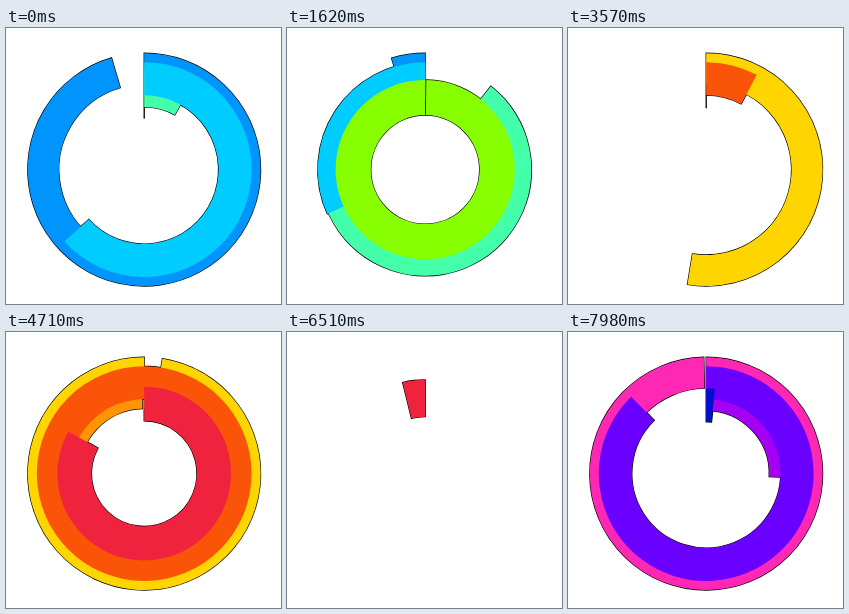
Recreate the animation shown at these times as an HTML page. Size 275 by 276 pixels, loop 8 s.

```html
<!DOCTYPE html>
<html lang="en">
<head>
<meta charset="utf-8">
<title>Ring loader</title>
<style>
  html, body { margin: 0; width: 100%; height: 100%; overflow: hidden; background: #fff; }
  svg { display: block; width: 100%; height: 100%; }
</style>
</head>
<body>
<svg viewBox="0 0 275 276">
  <path id="outline" fill="none" stroke="#000" stroke-width="1.3"/>
  <g id="fills"></g>
</svg>
<script>
const LOOP = 8000, STEP = 30, CX = 138.2, CY = 141.6;

// Each set of four rings starts at its own time.
const sets = [
  { at: -977, colors: ['#0094ff', '#00ccff', '#44ffaa', '#88ff00'] },
  { at: 2929, colors: ['#ffd500', '#fa5408', '#ff9505', '#f0233f'] },
  { at: 6838, colors: ['#ff28b4', '#6a00ff', '#a400f4', '#0010d0'] }
];

// head and tail: [delay, duration]; grow: [outer, inner] widening over life
const rings = [
  { outer: 116.4, inner: 85.4, grow: [0, 0], head: [0, 1260], tail: [1526, 1385] },
  { outer: 107.4, inner: 74.4, grow: [0, 0], head: [318, 1200], tail: [1825, 1354] },
  { outer: 99, inner: 62, grow: [10.5, 9], head: [625, 1290], tail: [2225, 1247] },
  { outer: 84.8, inner: 51.6, grow: [9, 5.3], head: [934, 1300], tail: [2550, 1310] }
];
const stacking = [0, 2, 1, 3];

const outline = document.getElementById('outline');
const group = document.getElementById('fills');
const fills = stacking.map(() =>
  group.appendChild(document.createElementNS('http://www.w3.org/2000/svg', 'path')));

const clamp = x => Math.min(1, Math.max(0, x));
const ease = x => x < 0.5 ? 4 * x ** 3 : 1 - 4 * (1 - x) ** 3;
const sweep = (time, [delay, duration]) => 360 * ease(clamp((time - delay) / duration));

function point(r, deg) {
  const a = deg * Math.PI / 180;
  return (CX + r * Math.sin(a)).toFixed(3) + ' ' + (CY - r * Math.cos(a)).toFixed(3);
}

function sector(outer, inner, from, to) {
  const mid = (from + to) / 2;
  const arc = (r, dir, deg) => `A${r} ${r} 0 0 ${dir} ${point(r, deg)}`;
  return `M${point(outer, from)}` + arc(outer, 1, mid) + arc(outer, 1, to) +
    `L${point(inner, to)}` + arc(inner, 0, mid) + arc(inner, 0, from) + 'Z';
}

function ringPath(ring, time) {
  const end = sweep(time, ring.head);
  let start = sweep(time, ring.tail);
  if (end <= 0 || start >= 360) return '';
  // An opening tail shows first as a dark seam.
  if (time > ring.tail[0]) start = Math.min(Math.max(start, 0.7), 359.95);
  const age = clamp((time - ring.head[0]) / 2650) ** 1.3;
  return sector(ring.outer + ring.grow[0] * age, ring.inner + ring.grow[1] * age, start, end);
}

function draw(t) {
  const set = sets.filter(s => s.at <= t).pop();
  const paths = stacking.map(i => ringPath(rings[i], t - set.at));
  outline.setAttribute('d', paths.join(''));
  fills.forEach((fill, k) => {
    fill.setAttribute('d', paths[k]);
    fill.setAttribute('fill', set.colors[stacking[k]]);
  });
}

const origin = performance.now();
function tick() {
  const t = (performance.now() - origin) % LOOP;
  draw(Math.floor(t / STEP) * STEP);
  requestAnimationFrame(tick);
}
tick();
</script>
</body>
</html>
```
